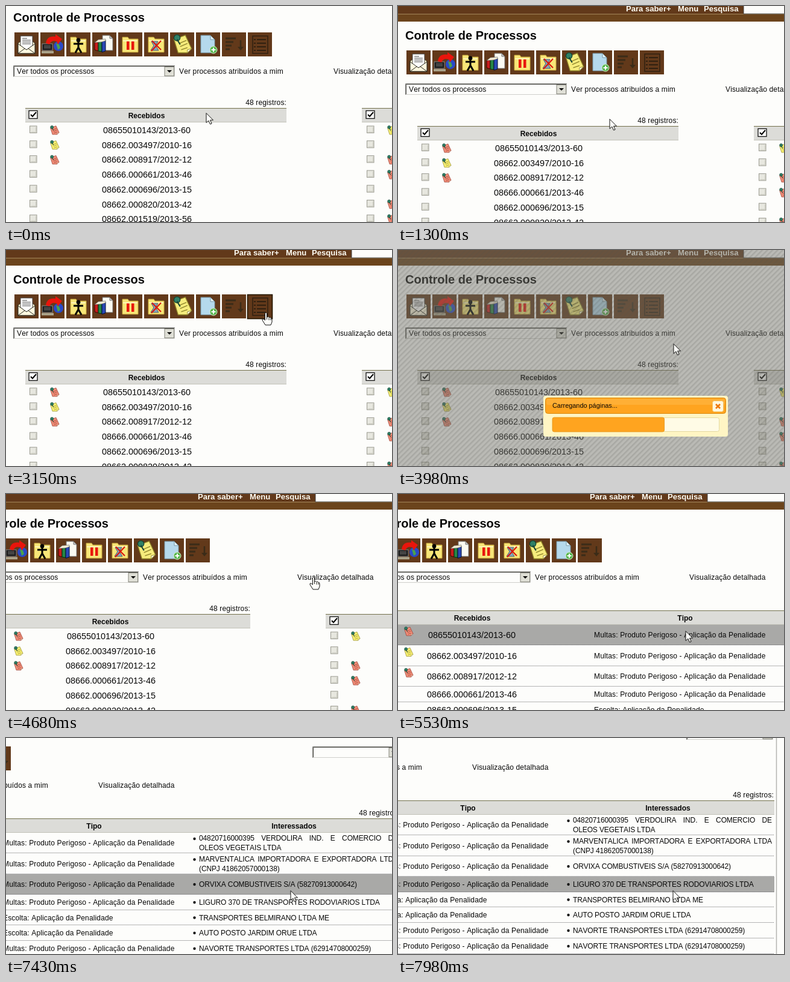
These frames come from a looping animation (640x360 px, 8 s). An HTML page:

```html
<!DOCTYPE html>
<html lang="pt-BR">
<head>
<meta charset="utf-8">
<title>Controle de Processos</title>
<style>
html, body { margin: 0; width: 100%; height: 100%; overflow: hidden; background: #fdfdfb; }
svg { display: block; width: 100vw; height: 100vh; }
text, .line { font-family: "Liberation Sans", Arial, sans-serif; font-kerning: none; fill: #080808; white-space: pre; }
.plain { letter-spacing: .14px; }
.caps { letter-spacing: -.12px; }
.line { font-size: 12px; line-height: 15px; color: #080808; white-space: nowrap; text-align-last: justify; }
</style>
</head>
<body>
<svg id="stage" viewBox="0 0 640 360"></svg>
<script>
const LOOP = 8000;
const PAPER = '#fdfdfb', BROWN = '#62391a', BAND = '#dcdcd8', OLIVE = '#73704c', ORANGE = '#ffa41f';

// ---- drawing helpers ----
const rect = (x, y, w, h, fill, more = '') =>
  `<rect x="${x}" y="${y}" width="${w}" height="${h}" fill="${fill}" ${more}/>`;
const path = (d, fill, more = '') => `<path d="${d}" fill="${fill}" ${more}/>`;
const line = (d, color, width = 1, more = '') =>
  path(d, 'none', `stroke="${color}" stroke-width="${width}" ${more}`);
const text = (x, y, str, size, more = '') =>
  `<text x="${x}" y="${y}" font-size="${size}" ${more}>${str}</text>`;
const plain = (x, y, str, more = '') => text(x, y, str, 12, 'class="plain" ' + more);
const caps = (x, y, str) => text(x, y, str, 12, 'class="caps"');
const bold = (x, y, str, size = 12.1, more = '') =>
  text(x, y, str, size, 'font-weight="bold" ' + more);
const MID = 'text-anchor="middle"', END = 'text-anchor="end"';
const at = (x, y, body, more = '') => `<g transform="translate(${x} ${y})" ${more}>${body}</g>`;

const folder = path('M7 11V8h9l2 3h15v22H7z', '#f8e678', 'stroke="#c9a93a"') +
  line('M8 14h24', '#fff6b8', 2);

function pinNote(color, edge) {
  return path('M2 5L13 1L19 14L15 18L6 18Z', color, `stroke="${edge}" stroke-width=".8"`) +
    line('M7 9l7-3M8 12l7-3M9 15l6-2', edge, .8) +
    path('M15 18l4-4l-4 1z', '#fffbe0', `stroke="${edge}" stroke-width=".5"`) +
    '<circle cx="5" cy="3.5" r="3" fill="#2f8066" stroke="#123f30" stroke-width=".7"/>' +
    line('M5 5l3 5', '#164536', 1.2);
}
const smallNote = (x, y, red) => at(x - 8, y - 8,
  `<g transform="scale(.84)">${red ? pinNote('#f08d78', '#8f3328') : pinNote('#f7ef72', '#8d8420')}</g>`);

const ICONS = [
  // open envelope
  path('M6 18L20 7L34 18V35H6z', '#fff3cf', 'stroke="#2a2a20"') +
  path('M10 6h20v18l-10 5l-10-5z', '#fff', 'stroke="#444"') +
  line('M13 10h8M13 13h14M13 16h14M13 19h14', '#444') +
  path('M6 19L20 29L34 19V35H6z', '#fff8df', 'stroke="#2a2a20"') + line('M6 35l11-8M34 35l-11-8', '#2a2a20'),
  // computer, globe and arrow
  '<circle cx="30" cy="23" r="8" fill="#2a49c8"/>' + path('M26 18l5 2l2 6l-4 3z', '#4aa34d') +
  rect(3, 19, 17, 11, '#1b1b1b', 'stroke="#888"') + rect(6, 21, 11, 6, '#444') + rect(2, 31, 20, 4, '#aaa289') +
  path('M9 18Q11 5 25 7L25 3L36 11L29 20L27 15Q18 12 15 20z', '#e9150c'),
  // folder and person
  folder + '<circle cx="20" cy="13" r="3.4" fill="#000"/>' +
  line('M12 19h16M20 16v10M20 25l-5 9M20 25l5 9', '#000', 3),
  // books and page
  path('M17 5h12l5 5v20H17z', '#fafaf2', 'stroke="#777"') + path('M29 5v5h5z', '#ccc', 'stroke="#777"') +
  path('M4 17l6-3v17l-6-2z', '#c71c1c', 'stroke="#400"') + path('M10 15l6-3v20l-6-1z', '#278645', 'stroke="#031"') +
  path('M16 15l6-2v18l-6 2z', '#2b48b5', 'stroke="#013"') + path('M4 17l6-5l12-1v3l-6 2z', '#f2ead2', 'stroke="#555" stroke-width=".6"'),
  // paused folder
  folder + rect(14, 15, 4.5, 14, '#e8160c') + rect(22, 15, 4.5, 14, '#e8160c'),
  // crossed folder
  folder + path('M12 15h11l-4 7l5 8h-13l5-8z', '#83a8bf', 'stroke="#4b5965"') +
  line('M13 14L28 29M28 14L12 31', '#d81810', 2.2),
  // pinned note
  `<g transform="translate(3 3) scale(1.72)">${pinNote('#f6ec7c', '#8c8128')}</g>`,
  // new page
  path('M8 5h16l7 7v22H8z', '#b5d9ec', 'stroke="#7797a8"') + path('M24 5v7h7z', '#e4f4fb', 'stroke="#7797a8"') +
  '<circle cx="29" cy="29" r="6" fill="#59b750" stroke="#d9f0cf"/>' + line('M25.5 29h7M29 25.5v7', '#fff', 2),
  // sort
  line('M6 10h17M6 16h13M6 22h10M6 28h7', '#3b2c18', 3) + line('M31 13v13', '#3b2c18', 2.5) + path('M26 24h10l-5 6z', '#3b2c18'),
  // list
  rect(8, 6, 25, 29, 'none', 'stroke="#302010" stroke-width="1.5"') +
  line('M15 12h15M15 18h15M15 24h15M15 30h15', '#302010', 2) +
  line('M10 12h3M10 18h3M10 24h3M10 30h3', '#302010', 2)
];
const iconX = i => 14 + 43 * i;

function select(x, y, w, label) {
  const bx = x + w - 17;
  return rect(x, y, w, 19, PAPER) + line(`M${x + .5} ${y + 19}V${y + .5}H${x + w}`, '#8a8a86') +
    line(`M${x + 1.5} ${y + 18}V${y + 1.5}H${x + w - 1}`, '#4c4c48') +
    line(`M${x + 1} ${y + 18.5}H${x + w - .5}V${y + 1}`, '#cfcfca') +
    rect(bx, y + 2.5, 15.5, 15, '#dfdfd6', 'stroke="#85857c"') +
    path(`M${bx + 4} ${y + 8}h8l-4 4z`, '#000') + plain(x + 6, y + 14, label);
}

const headCheck = x => rect(x, 204.5, 14, 13, PAPER, 'stroke="#111" stroke-width="1.3"') +
  line(`M${x + 3} 211l3 3l6-7`, '#000', 2);
const rowCheck = (x, y) => rect(x, y, 11.5, 11.5, '#e7e7df', 'stroke="#9a9a90"') +
  line(`M${x + 2} ${y + 10}h8V${y + 2}`, '#cbcbc0');
const band = (x, y, w, h) => rect(x, y, w, h, BAND) +
  line(`M${x} ${y + .5}h${w}`, OLIVE) + line(`M${x} ${y + h - .5}h${w}`, '#c2c2b8');

// ---- page content ----
const NUMBERS = ['08655010143/2013-60', '08662.003497/2010-16', '08662.008917/2012-12',
  '08666.000661/2013-46', '08662.000696/2013-15', '08662.000820/2013-42', '08662.001519/2013-56'];
const HAULER = ['NAVORTE TRANSPORTES LTDA (62914708000259)'];
const PARTIES = [
  ['04820716000395 VERDOLIRA IND. E COMERCIO DE', 'OLEOS VEGETAIS LTDA'],
  ['MARVENTALICA IMPORTADORA E EXPORTADORA LTDA', '(CNPJ 41862057000138)'],
  ['ORVIXA COMBUSTIVEIS S/A (58270913000642)'],
  ['LIGURO 370 DE TRANSPORTES RODOVIARIOS LTDA'],
  ['TRANSPORTES BELMIRANO LTDA ME'],
  ['AUTO POSTO JARDIM ORUE LTDA'],
  HAULER, HAULER];
const EDGES = [218, 252, 287, 321, 347, 372, 398, 424, 450];

function topArea() {
  return rect(-10, -40, 1200, 66, BROWN) + rect(-10, 13, 1200, 1, '#a5875a') + rect(-10, 14, 1200, 12, '#6b441c') +
    [[378, 'Para saber+'], [464, 'Menu'], [507, 'Pesquisa']]
      .map(([x, s]) => bold(x, 9, s, 13.1, 'style="fill:#fffdf4"')).join('') +
    rect(573, -8, 150, 21, PAPER, 'stroke="#444"') +
    line('M1047.5 26V460', '#b4b4b0', 1.5) +
    bold(12, 56, 'Controle de Processos', 20) +
    ICONS.map((body, i) => at(iconX(i), 74, rect(0, 0, 40, 40, BROWN) + body +
      rect(-.5, .5, 41, 40, 'none', 'stroke="#241600" stroke-width="1.6" class="hover" visibility="hidden"'), `id="icon${i}"`)).join('') +
    select(12, 129, 268, 'Ver todos os processos') +
    plain(287, 143, 'Ver processos atribuídos a mim') + plain(543, 143, 'Visualização detalhada');
}

function simpleTable() {
  const other = { 0: false, 2: true, 3: true, 5: true, 6: true };
  return plain(465, 195, '48 registros:', END) + band(32, 200, 433, 24) + band(590, 200, 433, 24) +
    headCheck(38) + headCheck(597) + bold(233, 217, 'Recebidos', 12, MID) +
    NUMBERS.map((n, i) => {
      const y = 237 + i * 24.7;
      return rowCheck(39.5, y - 7) + rowCheck(598.5, y - 7) + text(233.5, y + 5, n, 14.4, MID) +
        (i < 3 ? smallNote(80, y, i !== 1) : '') + (i in other ? smallNote(639, y, other[i]) : '');
    }).join('');
}

function detailTable() {
  const rows = PARTIES.map((lines, i) => {
    const top = EDGES[i], end = EDGES[i + 1], mid = (top + end) / 2;
    const kind = i === 4 || i === 5 ? 'Escolta: ' : 'Multas: Produto Perigoso - ';
    const two = lines.length > 1;
    const party = two
      ? `<foreignObject x="710" y="${mid - 15}" width="330" height="16"><div xmlns="http://www.w3.org/1999/xhtml" class="line caps">${lines[0]}</div></foreignObject>` +
        caps(710, mid + 12, lines[1])
      : caps(710, mid + 4, lines[0]);
    return text(182.5, mid + 5, NUMBERS[i] || '', 14.4, MID) + (i < 3 ? smallNote(77, mid - 6, i !== 1) : '') +
      plain(385, mid + 4, kind + 'Aplicação da Penalidade') +
      `<circle cx="702.5" cy="${two ? mid - 7 : mid}" r="2.2" fill="#111"/>` + party +
      line(`M32 ${end - .5}H1044`, '#6c6c70', 1, 'stroke-dasharray="1 1"');
  }).join('');
  return select(898, 74, 144, '') + plain(1043, 189, '48 registros:', END) +
    rect(32, 0, 1012, 0, '#a9a9a7', 'id="rowHover"') + band(32, 194, 1012, 24) +
    bold(183, 211, 'Recebidos', 12, MID) + bold(536, 211, 'Tipo', 12, MID) +
    bold(867.5, 211, 'Interessados', 12.1, MID) + rows;
}

const loader = rect(0, 0, 640, 360, 'url(#stripes)') +
  rect(241, 243, 306, 68, '#fff5c4', 'rx="4"') +
  rect(244.5, 246.5, 299, 26, ORANGE, 'rx="4" stroke="#d98a10"') + rect(246, 248, 296, 10, '#ffb845', 'rx="3" opacity=".6"') +
  text(256, 263, 'Carregando páginas...', 10.9) +
  rect(521.5, 251.5, 18, 18, '#fff8df', 'rx="3" stroke="#f3c46a"') + line('M527 257l7 7M534 257l-7 7', '#ee7a10', 2.8) +
  rect(256.5, 279.5, 276, 23, '#fffbe6', 'rx="3" stroke="#e5d9a0"') +
  rect(256, 279, 0, 24, ORANGE, 'id="bar" rx="3" stroke="#e39518" stroke-width=".8"');

const arrow = path('M0 1.5V17.5L3.8 14L6.5 20L9.1 19L6.5 13.2H11.5z', '#fffffa', 'stroke="#111" stroke-linejoin="round"');
const hand = path('M-1.5 1.5Q0 -1 1.5 1.5V8Q4 6 5 8.5Q7 7 8 9.5Q10 9 10 12V16L8 21H-1L-6 13Q-6.5 10 -4 11L-1.5 13z',
  '#fffffa', 'stroke="#111" stroke-linejoin="round"') + line('M1.5 8v4M5 9v4M8 10v3', '#111', .9);

document.getElementById('stage').innerHTML =
  `<defs><pattern id="stripes" width="6" height="6" patternUnits="userSpaceOnUse" patternTransform="rotate(45)">
   ${rect(0, 0, 6, 6, '#6e6e66', 'opacity=".47"')}${rect(0, 0, 2.5, 6, '#54544c', 'opacity=".17"')}</pattern></defs>` +
  rect(0, 0, 640, 360, PAPER) +
  `<g id="world">${topArea()}<g id="simple">${simpleTable()}</g><g id="detail">${detailTable()}</g></g>` +
  `<g id="loader">${loader}</g><g id="cursor"><g id="arrow">${arrow}</g><g id="hand">${hand}</g></g>`;

// ---- motion ----
const el = id => document.getElementById(id);
const show = (node, on) => node.setAttribute('visibility', on ? 'visible' : 'hidden');
const hovers = ICONS.map((_, i) => el('icon' + i).querySelector('.hover'));

// bursts of steps: start, end, count
const BURSTS = [[700, 1480, 11], [1550, 2330, 11], [2400, 3150, 10], [3230, 3980, 9], [4080, 4880, 11],
  [4950, 5730, 9], [5800, 6530, 9], [6650, 7430, 10], [7530, 7980, 6]];
// time, x, y of the pointer on the page
const POINTER = [[700, 332, 207], [2650, 431, 104], [3200, 431, 104], [3900, 457, 155], [4080, 457, 155],
  [4720, 575, 137], [4950, 575, 137], [5430, 537, 227], [5560, 537, 227], [6530, 710, 278], [6640, 710, 278],
  [7430, 862, 313], [7520, 862, 313], [7980, 876, 343]];
// time, x, y of the view, which jumps by 30
const VIEW = [[900, 0, 30], [1300, 0, 0], [4340, 0, 0], [4700, 60, 0], [5560, 60, 0], [6450, 240, 30],
  [6640, 240, 30], [7380, 390, 60], [7520, 390, 60], [7890, 420, 90]];

function stepTime(t) {
  let out = 0;
  for (const [a, b, n] of BURSTS) {
    if (t < a) break;
    const gap = (b - a) / (n - 1);
    out = a + Math.min(n - 1, Math.floor((t - a) / gap + 1e-6)) * gap;
  }
  return out;
}

function follow(keys, t, ease) {
  const i = keys.findIndex(k => k[0] > t);
  if (i === 0) return keys[0].slice(1);
  if (i < 0) return keys[keys.length - 1].slice(1);
  const [t0, x0, y0] = keys[i - 1], [t1, x1, y1] = keys[i];
  const p = ease((t - t0) / (t1 - t0));
  return [x0 + (x1 - x0) * p, y0 + (y1 - y0) * p];
}
const smooth = p => p * p * (3 - 2 * p);
const snap = v => Math.round(v / 30) * 30;

function draw(time) {
  const t = stepTime(time);
  const [px, py] = follow(POINTER, t, smooth);
  const [vx, vy] = follow(VIEW, t, p => p).map(snap);
  const loading = t >= 3230 && t < 4340, loaded = t >= 4340, detailed = t >= 4950;

  el('world').setAttribute('transform', `translate(${-vx} ${-vy})`);
  show(el('simple'), !detailed);
  show(el('detail'), detailed);
  el('icon9').setAttribute('display', loaded ? 'none' : 'inline');
  show(el('loader'), loading);
  el('bar').setAttribute('width', 277 * Math.max(0, Math.min(1, .67 * (t - 3230) / 750)));

  let over = false;
  hovers.forEach((h, i) => {
    const on = !loading && !(loaded && i === 9) && py >= 74 && py <= 114 && px >= iconX(i) && px <= iconX(i) + 40;
    show(h, on);
    over = over || on;
  });
  const link = !loading && py > 130 && py < 148 && ((px > 287 && px < 462) || (px > 543 && px < 670));
  show(el('hand'), over || link);
  show(el('arrow'), !(over || link));
  el('cursor').setAttribute('transform', `translate(${Math.round(px - vx)} ${Math.round(py - vy)})`);

  const row = EDGES.findIndex((y, i) => py >= y && py < EDGES[i + 1]);
  el('rowHover').setAttribute('y', row < 0 ? 0 : EDGES[row]);
  el('rowHover').setAttribute('height', row < 0 ? 0 : EDGES[row + 1] - EDGES[row]);
}

const start = performance.now();
function tick() {
  draw((performance.now() - start) % LOOP);
  requestAnimationFrame(tick);
}
tick();
</script>
</body>
</html>
```
